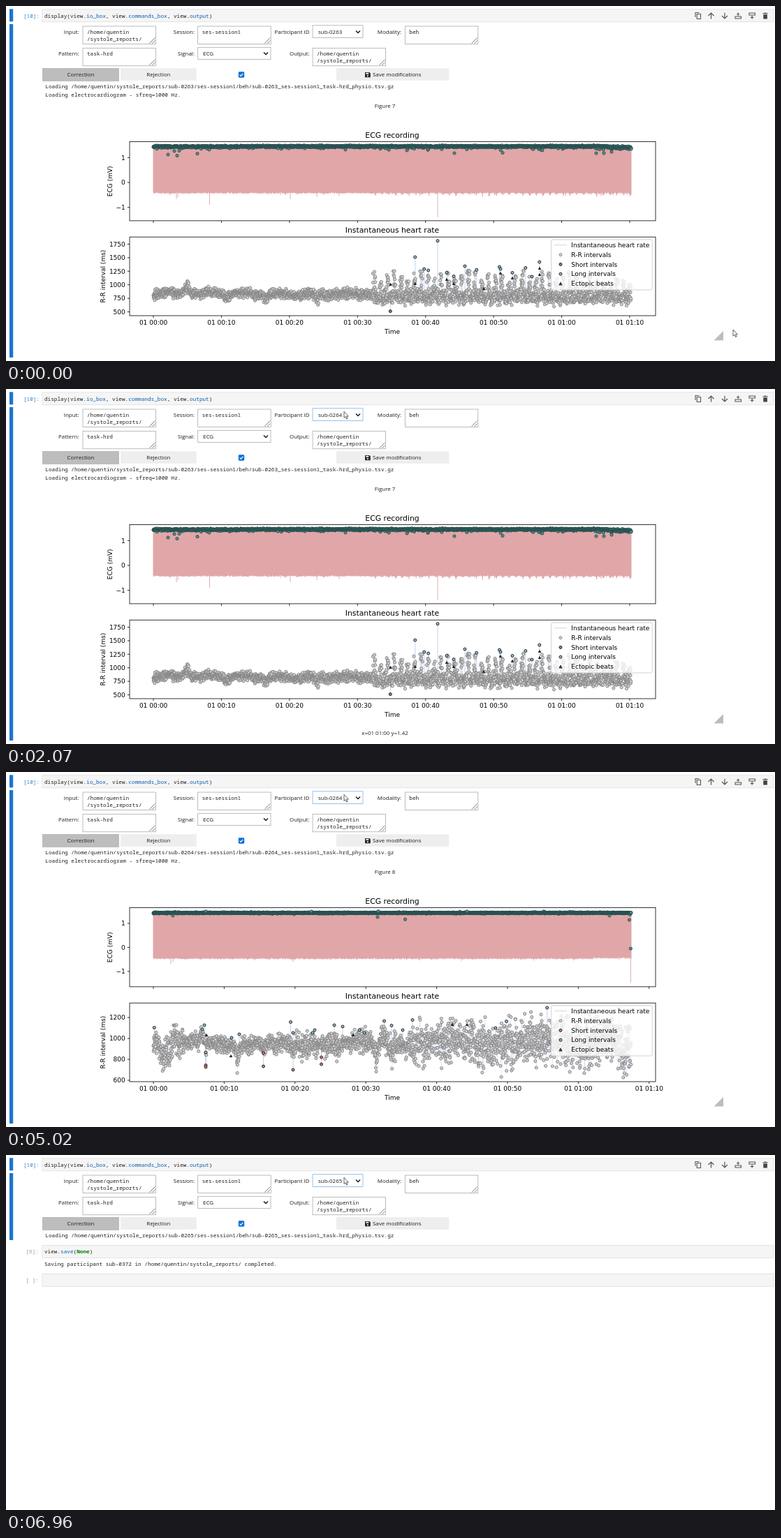
An HTML page with a canvas for the animation above (8000 ms loop, 1101x509 px).

```html
<!DOCTYPE html>
<html lang="en">
<head>
<meta charset="utf-8">
<title>Notebook viewer</title>
<style>
  html, body { margin: 0; width: 100%; height: 100%; overflow: hidden; background: #fff; }
  canvas, svg { position: absolute; left: 0; top: 0; width: 1101px; height: 509px; }
  text { white-space: pre; }
  .ui { font: 7.95px "Open Sans", "Noto Sans", sans-serif; fill: #1c1c1c; }
  .code { font: 7.71px "Noto Sans Mono", "DejaVu Sans Mono", monospace; fill: #212121; }
  .plot { font: 9px "DejaVu Sans", sans-serif; fill: #000; }
  .title { font: 10.8px "DejaVu Sans", sans-serif; fill: #000; }
  .prop { fill: #0a5cad; }
  .kw { fill: #008000; font-weight: bold; }
  .dim { fill: #9a9a9a; }
  .end { text-anchor: end; }
  .mid { text-anchor: middle; }
</style>
</head>
<body>
<canvas id="plotA" width="1101" height="509"></canvas>
<canvas id="plotB" width="1101" height="509"></canvas>
<svg id="stage" viewBox="0 0 1101 509"></svg>
<script>
const LOOP = 8000;
const HOME = '/home/quentin';
const LEFT = 177, RIGHT = 930;

// Axis geometry of both figures: pixel origin and pixels per unit
const FIGS = {
  A: { name: 'Figure 7', dx: 97.43, ecg: [253, 35.7], hr: [341.5, 19.4, 1750, 250, 6], shortFill: '#6f8f95' },
  B: { name: 'Figure 8', dx: 101.4, ecg: [251.5, 34.5], hr: [352, 30, 1200, 200, 4], shortFill: '#d9797c' }
};
const LONG_FILL = '#8fc3d6';

// ---- SVG helpers ----
const text = (x, y, s, cls, extra = '') => `<text x="${x}" y="${y}" class="${cls}" ${extra}>${s}</text>`;
const rect = (x, y, w, h, fill, stroke = 'none', extra = '') =>
  `<rect x="${x}" y="${y}" width="${w}" height="${h}" fill="${fill}" stroke="${stroke}" ${extra}/>`;
const path = (d, stroke, w = 1, fill = 'none', extra = '') =>
  `<path d="${d}" stroke="${stroke}" stroke-width="${w}" fill="${fill}" ${extra}/>`;
const group = (id, body) => `<g id="${id}">${body}</g>`;
const cellBox = y => rect(51.9, y, 1047, 18, '#f5f5f5', '#dcdcdc', 'stroke-width=".7"');
const chevron = (x, y) => path(`M${x - 3} ${y - 1.5}l3 3 3-3`, '#111', 1.3);

function area(x, y, lines) {
  const r = x + 104.5, b = y + 25.5;
  return rect(x, y, 104.5, 25.5, '#fff', '#9e9e9e', 'stroke-width=".7"') +
    lines.map((s, i) => text(x + 6, y + 10.6 + i * 10, s, 'code')).join('') +
    path(`M${r - 9} ${b - 1}l8-8M${r - 5} ${b - 1}l4-4`, '#555', .8);
}

function toolbar() {
  const ink = '#555';
  return path('M987 16v-6.5h5.5M989.3 11.5h5.2v7h-5.2z', ink, 1.1) +
    path('M1009.5 18.5v-8M1005.5 14l4-4 4 4', ink, 1.2) +
    path('M1029 9.8v8M1025 14l4 4 4-4', ink, 1.2) +
    path('M1044 15h8.5v3h-8.5zM1048.2 9.5v4.5M1046 11.8h4.4', ink, 1.1) +
    path('M1064 10h8.5v3h-8.5zM1068.2 14v4.8M1066 16.4h4.4', ink, 1.1) +
    path('M1084.3 12.2h5.6v6.3h-5.6zM1083.5 10.2h7.2v1h-7.2zM1086 9.6h2.2v.8h-2.2z', 'none', 0, '#444');
}

function form() {
  const label = (x, y, s) => text(x, y, s, 'ui end');
  return label(104.5, 40, 'Input:') + label(104.5, 71, 'Pattern:') +
    label(270, 40, 'Session:') + label(270, 71, 'Signal:') +
    label(434.5, 40, 'Participant ID') + label(434.5, 71, 'Output:') + label(566, 40, 'Modality:') +
    area(110, 29, [HOME, '/systole_reports/']) + area(110, 60.3, ['task-hrd']) +
    area(274.7, 29, ['ses-session1']) + area(439, 60.3, [HOME, '/systole_reports/']) +
    area(571.3, 29, ['beh']) +
    rect(274.7, 59.3, 104.3, 17.2, '#fff', '#9e9e9e', 'stroke-width=".7"') +
    text(282, 70.8, 'ECG', 'ui') + chevron(372, 68) +
    rect(439, 27.8, 72, 17.6, '#fff', '#9e9e9e', 'id="select" stroke-width=".7"') +
    text(447, 39.6, '', 'ui', 'id="choice"') + chevron(504, 37) +
    rect(52, 90.2, 110, 18, '#dedede', 'none') +
    rect(52.6, 89.4, 108.6, 17.8, '#bdbdbd', '#aaa', 'stroke-width=".6"') +
    rect(164, 89.2, 108.7, 17.6, '#eee') + rect(473, 89.2, 161.3, 17.6, '#eee') +
    text(107, 101, 'Correction', 'ui mid') + text(218.3, 101, 'Rejection', 'ui mid') +
    text(525, 101, 'Save modifications', 'ui') +
    path('M514 95h6.2l1.6 1.6v5.6h-7.8z', 'none', 0, '#222') +
    rect(515.3, 95.8, 4, 2, '#eee') + '<circle cx="517.8" cy="100.2" r="1.1" fill="#eee"/>' +
    rect(332.8, 94.3, 8.4, 8.4, '#0b70d8', 'none', 'rx="1.4"') +
    path('M334.7 98.6l1.6 1.7 3-3.5', '#fff', 1.2);
}

function cells() {
  return cellBox(129.6) + text(47, 141, '[6]:', 'code dim end') +
    text(55, 141, 'view.<tspan class="prop">save</tspan>(<tspan class="kw">None</tspan>)', 'code') +
    text(55, 159, `Saving participant sub-0372 in ${HOME}/systole_reports/ completed.`, 'code') +
    cellBox(170.4) + text(47, 182, '[ ]:', 'code dim end');
}

function legend(shortFill) {
  const names = ['Instantaneous heart rate', 'R-R intervals', 'Short intervals', 'Long intervals', 'Ectopic beats'];
  const dot = (y, fill, stroke) => `<circle cx="794" cy="${y}" r="2" fill="${fill}" stroke="${stroke}" stroke-width=".9"/>`;
  return rect(780.7, 335, 144.5, 72, 'rgba(255,255,255,.8)', '#ccc', 'rx="2" stroke-width=".9"') +
    path('M785 342.7h18', '#c5cbe6', .8) + dot(356.6, '#d3d3d3', '#808080') +
    dot(370.4, shortFill, '#111') + dot(384.3, LONG_FILL, '#111') +
    path('M794 395.9l2.1 4.2h-4.2z', '#111', .7, '#444') +
    names.map((s, i) => text(809.3, 345.8 + i * 13.86, s, 'plot')).join('');
}

function figure(key) {
  const f = FIGS[key], frame = 'stroke-width=".8"';
  let s = rect(LEFT, 194.5, RIGHT - LEFT, 113.4, 'none', '#000', frame) +
    rect(LEFT, 331.2, RIGHT - LEFT, 112.8, 'none', '#000', frame) +
    text(542.6, 145.8, f.name, 'ui mid') +
    text(553, 189, 'ECG recording', 'title mid') +
    text(553, 325.2, 'Instantaneous heart rate', 'title mid') +
    text(553, 470, 'Time', 'plot mid') +
    text(0, 0, 'ECG (mV)', 'plot mid', 'transform="translate(151.5 251.3) rotate(-90)"') +
    text(0, 0, 'R-R interval (ms)', 'plot mid', 'transform="translate(141.6 387.6) rotate(-90)"');
  let ticks = '';
  for (let i = 0; i < 8; i++) {
    const x = 211 + i * f.dx;
    ticks += `M${x} 307.9v3.2M${x} 444v3.2`;
    s += text(x, 457.4, `01 0${i / 6 | 0}:${i % 6}0`, 'plot mid');
  }
  for (let v = -1; v < 2; v++) {
    const y = f.ecg[0] - v * f.ecg[1];
    ticks += `M${LEFT} ${y}h-3.2`;
    s += text(170.8, y + 3.3, String(v).replace('-', '−'), 'plot end');
  }
  const [y0, dy, v0, dv, n] = f.hr;
  for (let i = 0; i < n; i++) {
    const y = y0 + i * dy;
    ticks += `M${LEFT} ${y}h-3.2`;
    s += text(170.8, y + 3.3, v0 - i * dv, 'plot end');
  }
  return group('fig' + key, s + path(ticks, '#000', .8) + legend(f.shortFill));
}

function dropdown() {
  let s = rect(437, 47, 72, 304, '#fff', '#8a8a8a', 'stroke-width=".7"');
  for (let i = 0; i < 20; i++) {
    const y = 47.2 + i * 15.18, on = i === 3;
    if (on) s += rect(437.4, y, 71.2, 15, '#1967d2');
    s += text(447, y + 10.5, 'sub-0' + (260 + i), 'ui', on ? 'style="fill:#fff"' : '');
  }
  return group('list', s);
}

const stage = document.getElementById('stage');
stage.innerHTML =
  rect(5, 4.3, 5.2, 18, '#1976d2') + rect(5, 26, 5.2, 478, '#1976d2', 'none', 'id="bar"') +
  cellBox(4.8) + text(25, 16.5, '[10]:', 'code', 'style="fill:#307fc1"') +
  text(55, 16.5, 'display(view.<tspan class="prop">io_box</tspan>, view.<tspan class="prop">commands_box</tspan>, view.<tspan class="prop">output</tspan>)', 'code') +
  toolbar() + form() +
  text(56.3, 118.3, '', 'code', 'id="load1"') +
  text(56.3, 129.5, 'Loading electrocardiogram - sfreq=1000 Hz.', 'code', 'id="load2"') +
  group('cells', cells()) + figure('A') + figure('B') +
  path('M1027 466v13.5h-13.5z', 'none', 0, '#bdbdbd', 'id="grip"') +
  text(542.5, 495.6, '', 'ui mid', 'id="status"') + dropdown() +
  '<circle id="click" cx="484" cy="34" r="8.5" fill="#e8d820" fill-opacity=".65"/>' +
  path('M0 0v9.2l2.1-1.9 1.5 3.4 1.5-.7-1.5-3.2h2.7z', '#222', .7, '#fff', 'id="cursor"');

// ---- Plots ----
function seeded(n) {
  return () => {
    n = (n + 0x6d2b79f5) | 0;
    let t = Math.imul(n ^ n >>> 15, 1 | n);
    t = t + Math.imul(t ^ t >>> 7, 61 | t) ^ t;
    return ((t ^ t >>> 14) >>> 0) / 4294967296;
  };
}
const bell = (x, c, w) => Math.exp(-(((x - c) / w) ** 2));

function painter(id) {
  const g = document.getElementById(id).getContext('2d');
  return {
    dot(x, y, fill, stroke, r = 2.1) {
      g.beginPath(); g.arc(x, y, r, 0, 7);
      g.fillStyle = fill; g.fill();
      g.strokeStyle = stroke; g.lineWidth = .9; g.stroke();
    },
    tri(x, y) {
      g.beginPath(); g.moveTo(x, y - 2.3); g.lineTo(x + 2.3, y + 2); g.lineTo(x - 2.3, y + 2); g.closePath();
      g.fillStyle = '#222'; g.fill();
    },
    line(pts, color, w) {
      g.beginPath(); pts.forEach(p => g.lineTo(p[0], p[1]));
      g.strokeStyle = color; g.lineWidth = w; g.stroke();
    }
  };
}

function drawPlot(id, o) {
  const p = painter(id), rnd = seeded(o.seed);
  const gauss = () => (rnd() + rnd() + rnd() - 1.5) * 2;
  const pink = '#e1a6a8', teal = '#548e8b', deep = '#264c4c';
  for (let x = 211; x <= 895; x += .5) p.line([[x, 203], [x, o.floor(x, rnd)]], pink, 1);
  o.spikes.forEach(([x, y]) => p.line([[x, 262], [x, y]], pink, .9));
  for (let x = 211; x <= 895; x += .3) p.dot(x, o.peak(x, gauss, rnd), teal, deep);
  o.peaks.forEach(([x, y]) => p.dot(x, y, teal, deep));

  const pts = [];
  for (let x = 211; x <= 895; x += o.step) pts.push([x, Math.max(336, Math.min(438, o.beat(x, gauss, rnd)))]);
  p.line(pts, 'rgba(120,140,215,.22)', .5);
  [...o.long, ...o.short].forEach(([x, y]) => p.line([[x, y], [x, o.mean]], '#b9c4e6', .8));
  pts.forEach(([x, y]) => p.dot(x, y, '#cfcfcf', '#808080'));
  o.long.forEach(([x, y]) => p.dot(x, y, LONG_FILL, '#111', 2));
  o.short.forEach(([x, y]) => p.dot(x, y, o.shortFill, '#111', 2));
  o.ectopic.forEach(([x, y]) => p.tri(x, y));
}

drawPlot('plotA', {
  seed: 7, step: .24, mean: 412, shortFill: FIGS.A.shortFill,
  floor: (x, r) => 267 + r() * 2.2 + (r() < .03 ? 4 * r() : 0) +
    (x > 520 ? 5 * r() * bell((x - 525) % 9.6, 4, 1.2) : 0),
  spikes: [[244, 277], [246, 274], [291.5, 285], [407, 277], [445, 274], [618, 302.5]],
  peak: (x, g, r) => 201.7 + g() * .7 - (x > 330 && x < 860 ? .4 : 0) +
    (r() < .05 ? r() * (x > 520 ? 5.5 : 3) : 0) + (x > 865 ? r() * 2.5 : 0),
  peaks: [[232, 213], [245, 214.5], [274, 211.7], [241, 208], [248, 207.5], [291, 206], [486, 206],
    [642, 211], [711, 210.5], [845, 211], [856, 211], [574, 207], [895, 205]],
  beat(x, g, r) {
    if (x < 525) {
      return 411.5 + 2.5 * bell(x, 420, 100) + 1.6 * Math.sin(x / 8) + g() * 3.4 -
        15 * bell(x, 260, 4.5) * (.4 + .6 * r()) + 9 * r() * (bell(x, 317, 4) + bell(x, 372, 4) + bell(x, 446, 4));
    }
    const k = (x - 525) / 9.65, n = Math.floor(k);
    const amp = (30 + 17 * Math.abs(Math.sin(n * 2.3 + 1))) * (x > 840 ? .75 : 1);
    return k - n < .4 ? 425 - r() * amp : 417 + g() * 5.2;
  },
  long: [[618, 336.7], [585.7, 360], [598.7, 377], [604.6, 379], [631, 382.5], [641, 387.5], [657, 373],
    [673.7, 378.3], [706.5, 374], [708, 377], [725, 382.5], [743.8, 375.5], [753, 388], [763.8, 367]],
  short: [[550.3, 437.6]],
  ectopic: [[550.5, 399], [585.7, 398], [631, 392], [641, 398], [684, 405], [708, 383], [725, 390], [764, 376], [764, 385]]
});

const DIPS = [[226, 38, 5], [235, 24, 4], [247, 14, 3], [286, 22, 1.6], [331, 36, 3], [368, 26, 3],
  [386, 22, 3], [411, 25, 3], [424, 16, 3], [476, 14, 3], [531, 46, 3.5], [553, 18, 3]];
drawPlot('plotB', {
  seed: 21, step: .26, mean: 391, shortFill: FIGS.B.shortFill,
  floor: (x, r) => 266.3 + r() * 2.4 + (r() < .04 ? 2.5 * r() : 0) - (x > 840 ? 1 : 0),
  spikes: [[236, 275.5], [239, 272], [411, 272], [894.5, 302]],
  peak: (x, g, r) => 202 + g() * .45 + (r() < .02 ? r() * 3 - 1.5 : 0),
  peaks: [[239, 206], [532, 208], [571.6, 211.3], [864, 206], [892.4, 212], [894.4, 253.2],
    [286, 199.8], [437, 200], [533, 199.6], [660, 199.8]],
  beat(x, g, r) {
    let y = 389 - 3 * Math.sin(x / 19);
    DIPS.forEach(([c, d, w]) => { y += d * r() * bell(x, c, w); });
    y -= 24 * r() * (bell(x, 241, 5) + bell(x, 281, 3) + bell(x, 540, 5));
    if (x > 870) y += (x - 870) * .45;
    const wave = Math.abs(Math.sin(x / 13));
    const sigma = x < 255 ? 8 : x < 400 ? 4 + 2 * wave : x < 572 ? 4.5 + 4.5 * wave : 9 + 6 * wave + (x - 572) * .018;
    return y + g() * sigma;
  },
  long: [[212.3, 366.5], [284, 363], [281, 369], [334, 376], [323, 381], [407.5, 358.5], [411, 374], [439, 374],
    [442, 370], [470, 363], [482, 365], [506, 370], [513, 374], [541.5, 357], [552, 363.5], [568, 370],
    [582, 355.5], [701, 367], [716.5, 357.5], [774.7, 338], [286, 402]],
  short: [[286, 420.5], [286, 423], [368.5, 422], [368.5, 403], [411, 427], [451.5, 409], [451.5, 419]],
  ectopic: [[287, 377], [322, 407], [639, 362], [660, 362], [497, 377]]
});

// ---- Timeline ----
// start, chosen subject, loaded subject, log lines, figure
const PHASES = [
  [0, 263, 263, 2, 'A'], [2070, 264, 263, 2, 'A'], [2150, 264, 264, 0, ''], [2310, 264, 264, 1, ''],
  [3920, 264, 264, 2, ''], [4850, 264, 264, 2, 'empty'], [5020, 264, 264, 2, 'B'],
  [6730, 265, 264, 2, 'B'], [6810, 265, 265, 0, ''], [6960, 265, 265, 1, '']
];
const el = id => document.getElementById(id);
const show = (id, on) => { el(id).style.visibility = on ? 'visible' : 'hidden'; };
const between = (t, a, b) => t >= a && t < b;

function pointer(step) {
  const u = step / 8, s = u * u * (3 - 2 * u), q = 1 - s;
  const mix = (a, b, c) => a * q * q + 2 * b * q * s + c * s * s;
  return [mix(1041, 829.5, 484), mix(464, 156.6, 32.3)];
}

// Last coordinates reported while the pointer was inside an axes
function readout(step) {
  for (let i = step; i > 0; i--) {
    const [x, y] = pointer(i);
    const ecg = between(y, 194.5, 308), hr = between(y, 331, 444);
    if (!between(x, LEFT, RIGHT) || !(ecg || hr)) continue;
    const min = Math.round((x - 211) / 9.743);
    const value = ecg ? ((253 - y) / 35.7).toFixed(2) : (1750 - (y - 341.5) * 12.89).toFixed(0);
    return `x=01 0${min / 60 | 0}:${String(min % 60).padStart(2, '0')} y=${value}`;
  }
  return '';
}

function render(t) {
  const [, choice, loaded, lines, fig] = PHASES.filter(p => p[0] <= t).pop();
  const step = t < 70 ? 0 : Math.min(8, 1 + Math.floor((t - 70) / 72.8));
  const [x, y] = pointer(step), sub = 'sub-0' + loaded;
  el('cursor').setAttribute('transform', `translate(${x} ${y})`);
  el('choice').textContent = 'sub-0' + choice;
  el('select').setAttribute('stroke', t >= 830 ? '#64a9e8' : '#9e9e9e');
  el('load1').textContent = `Loading ${HOME}/systole_reports/${sub}/ses-session1/beh/${sub}_ses-session1_task-hrd_physio.tsv.gz`;
  el('status').textContent = fig === 'A' ? readout(step) : '';
  el('bar').setAttribute('height', fig ? 478 : 84.8 + lines * 11.2);
  el('cells').setAttribute('transform', `translate(0 ${(lines - 1) * 11.2})`);
  show('load1', lines > 0);
  show('load2', lines > 1);
  show('cells', !fig);
  show('grip', fig);
  for (const k of ['A', 'B']) { show('fig' + k, fig === k); show('plot' + k, fig === k); }
  show('list', between(t, 830, 1140));
  show('click', between(t, 750, 910) || between(t, 1140, 1220));
}

const start = performance.now();
function tick() {
  render((performance.now() - start) % LOOP);
  requestAnimationFrame(tick);
}
tick();
</script>
</body>
</html>
```
